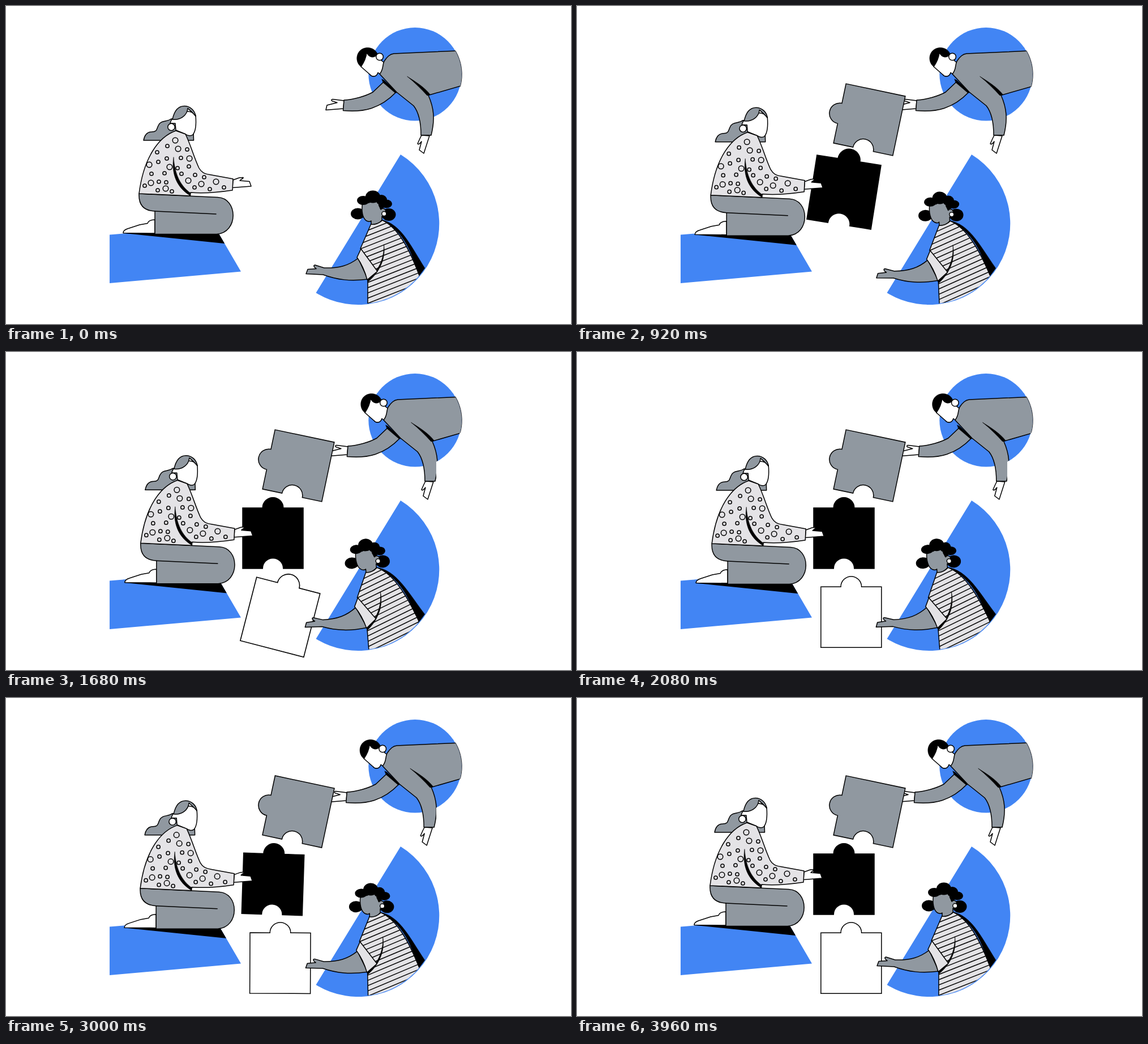
Recreate the animation shown at these times as an HTML page. Size 998x561 px, loop 4000 ms.

```html
<!DOCTYPE html>
<html lang="en">
<head>
<meta charset="utf-8">
<title>Teamwork puzzle</title>
<style>
  html, body { margin: 0; width: 100%; height: 100%; overflow: hidden; background: #fff; }
  svg { display: block; width: 100%; height: 100%; }
  .gray, .light, .white, .line, .ink { stroke: #000; stroke-width: 1.5; stroke-linejoin: round; stroke-linecap: round; }
  .gray { fill: #9098a0; }
  .light { fill: #e4e3e6; }
  .white { fill: #fff; }
  .line { fill: none; }
  .ink { fill: #000; stroke-width: .6; }
  .blue { fill: #4285f4; }
</style>
</head>
<body>
<svg viewBox="0 0 998 561">
  <defs>
    <clipPath id="diskClip"><rect width="760" height="561"/><circle cx="722.5" cy="120.3" r="82.2"/></clipPath>
    <clipPath id="fanClip"><circle cx="621.5" cy="383.7" r="142.3"/></clipPath>
    <clipPath id="matClip"><path d="M183 403.5L368 388L415 468.5L183 489Z"/></clipPath>
    <clipPath id="shirtClip"><path id="shirtShape" d="M645 384C652 386 659 383 665 378C694 392 714 432 731 478L722 530H639V482L655 468L626 428Z"/></clipPath>
  </defs>

  <path class="blue" d="M183 403.5L368 388L415 468.5L183 489Z"/>
  <circle class="blue" cx="722.5" cy="120.3" r="82.2"/>
  <path class="blue" d="M697 262A142.5 142.5 0 0 1 547.5 506Z"/>

  <!-- leaning man -->
  <g clip-path="url(#diskClip)"><g id="leaner">
    <path class="white" d="M597 167L577 164.500C573 165.500 575 168 579 168.500L585 170.500L567 175L565 183.500L596 181Z"/>
    <path class="gray" d="M667 134L648 152C635 159 615 165 597 166L595.500 184.500C632 188 661 181 689 152Z"/>
    <path class="ink" d="M664 129L668 131L692 153L687 153L666 135Z"/>
    <path class="white" d="M734 228L731 234L727 243C728 245 731 243 734 239L730 254L738 260L748 229Z"/>
    <path class="white" d="M637 82C641 90 649 93 656 85C664 80 669 91 663 96L668 100C667 110 665 115 662 121L657 117.500C655 125 647 126 643 121L627 107C632 100 636 92 637 82Z"/>
    <path class="gray" d="M685 84L830 77.600V133.400L746 157.500C756 180 758 200 751 228L733 228C733 210 731 190 720 176L690 152L660 120C668 111 664 102 669 96C674 89 678 85 685 84Z"/>
    <path class="ink" d="M709 124.500C724 134 739 143 749.500 156.500L744 158C734 147 722 135 709 124.500Z"/>
    <circle class="white" cx="660" cy="89.500" r="6.300"/>
    <path class="ink" d="M627 107C617 100 617 82 630 75.500C642 70 654 77 656 85C649 93 641 90 637 82C636 92 630 101 627 107Z"/>
  </g></g>
  <path class="line" style="stroke-width:.8" d="M794 79A82.200 82.200 0 0 1 802.500 142"/>

  <g id="pieces"></g>

  <!-- kneeling woman -->
  <g clip-path="url(#matClip)"><path id="shade" d="M205 400.500L400 396V420.500Z"/></g>
  <g id="kneeler">
    <path class="gray" d="M243 237C245 226 250 222 258 222C267 222 266 217 269 211C273 201 284 205 292 199L331 222L331.500 237Z"/>
    <path class="white" d="M297 196C308 188 325 180 335 193C336 205 336 220 330 227C327 230 321 229 317 226L300 219L299 207L290 207C291 202 293 199 297 196Z"/>
    <path class="gray" d="M294 200C297 186 304 176.500 315 176.500C326 176.500 334 185 335 194.500C330 188 325 184 321 180.500C320 193 308 202 294 200Z"/>
    <circle class="white" cx="292" cy="213.500" r="6.200"/>
    <path class="white" d="M207 400.500C207 396 211 394 216 392.500L236 386L250 383.500C252 378 257 377 263 377V401Z"/>
    <path class="gray" d="M235 331L374 337.500C410 339 411 400 372 402.500H263V362C243 361 234 351 235 331Z"/>
    <path class="line" d="M263 362L371 367"/>
    <path class="white" d="M401 307L412 303L419 302.500C420 304 414 306 413 308L430 309.500L433 318L400 320.500Z"/>
    <path class="light" d="M300 220C269 231 243 268 235 331L325 335L326 329C350 331 380 328 400 325L401 305L360 297.500C350 296 345 293 341 286C332 267 327 247 317 226Z"/>
    <g id="dots"></g>
    <path class="ink" d="M296 267C292 296 301 320 326 335V330C309 318 298 298 296 267Z"/>
  </g>

  <!-- reaching man -->
  <g clip-path="url(#fanClip)"><g id="reacher">
    <path class="ink" d="M662 377C700 384 716 427 746 472L730 484C720 440 704 396 662 377Z"/>
    <use href="#shirtShape" class="light"/>
    <g id="stripes" clip-path="url(#shirtClip)"></g>
    <path class="ink" d="M667.500 421C671 446 660 470 639 487V482C657 468 668 448 667.500 421Z"/>
    <path class="gray" d="M622 445C605 458 588 463 562 462L546 457C542 457 544 461 548 463.500L533 464.500L530 472.500L560 474C585 483 608 486 639 482Z"/>
    <path class="light" d="M620 443.500L627 428.500L656 468L638 483C634 468 629 456 620 443.500Z"/>
    <ellipse cx="621.500" cy="366.500" rx="12.500" ry="10"/>
    <ellipse cx="676" cy="368" rx="12.500" ry="11"/>
    <path class="gray" d="M630 345C627 362 630 375 637 379C641 381 644 380 645 379V385C652 386 660 383 664 378V371C672 371 673 358 666 357C662 357 662 361 661 356L657 343Z"/>
    <ellipse cx="631" cy="343" rx="11" ry="8"/>
    <ellipse cx="648" cy="336.500" rx="13" ry="11"/>
    <ellipse cx="640" cy="343" rx="5" ry="5"/>
    <ellipse cx="663" cy="342" rx="10" ry="9"/>
    <ellipse cx="672" cy="349" rx="10" ry="7.500"/>
    <path d="M657 343H668V355L662 360L658 352Z"/>
    <circle class="white" cx="667.800" cy="366.500" r="4"/>
  </g></g>
</svg>

<script>
const LOOP = 4000;
const $ = id => document.getElementById(id);

function add(parent, tag, attrs) {
  const el = document.createElementNS("http://www.w3.org/2000/svg", tag);
  for (const k in attrs) el.setAttribute(k, attrs[k]);
  return parent.appendChild(el);
}

// Smooth curve through [time, value] pairs, flat at both ends.
function curve(keys, t) {
  const n = keys.length - 1;
  if (t <= keys[0][0]) return keys[0][1];
  if (t >= keys[n][0]) return keys[n][1];
  let i = 0;
  while (t >= keys[i + 1][0]) i++;
  const slope = j => j === 0 || j === n ? 0
    : (keys[j + 1][1] - keys[j - 1][1]) / (keys[j + 1][0] - keys[j - 1][0]);
  const [t0, a] = keys[i], [t1, b] = keys[i + 1];
  const d = t1 - t0, u = (t - t0) / d, v = 1 - u;
  return v * v * (1 + 2 * u) * a + u * u * (3 - 2 * u) * b
    + d * u * v * (v * slope(i) - u * slope(i + 1));
}

const ease = x => (1 - Math.cos(Math.PI * Math.min(1, Math.max(0, x)))) / 2;
const sway = (t, top, leave, end) => ease(t / top) - ease((t - leave) / (end - leave));

// Blouse dots
const big = [[299,237],[304,252],[253,280],[324,269],[289,284],[256,312],[282,322],[322,308],[345,314],[371,310]];
const small = [[285,247],[267,258],[320,253],[269,275],[284,269],[309,268],[257,296],[280,295],[303,286],
  [310,296],[323,283],[245,317],[268,325],[270,310],[293,327],[283,311],[334,298],[350,302],[333,320],[360,323],[385,320]];
const dot = r => ([cx, cy]) => add($("dots"), "circle", { cx, cy, r, class: "line" });
big.forEach(dot(4.8));
small.forEach(dot(3.1));

// Shirt stripes
for (let y = 398; y < 580; y += 9.2)
  add($("stripes"), "path", { d: `M610 ${y}L750 ${y - 55}`, class: "line" });

// Puzzle pieces: square of half size 53.5 with round tabs and notches
const arc = (sweep, x, y) => `A18.3 18.3 0 0 ${sweep} ${x} ${y}`;
const H = 53.5, R = 18.3;
const topTab = `L${-R} ${-H}${arc(1, R, -H)}`;
const notch = `L${R} ${H}${arc(0, -R, H)}`;
const leftTab = `L${-H} ${R}${arc(1, -H, -R)}`;
const outline = (top, bottom, left) =>
  `M${-H} ${-H}${top}L${H} ${-H}L${H} ${H}${bottom}L${-H} ${H}${left}Z`;

const pieces = [
  { x: 516.5, y: 200.5, turn: 11.9, start: 0, fill: "#9098a0", d: outline("", notch, leftTab),
    wobble: [[2080, 0], [2680, -.4], [3320, .7], [3960, 0]] },
  { x: 471.5, y: 328.5, turn: 0, start: 600, fill: "#000", d: outline(topTab, notch, ""),
    wobble: [[2080, 0], [2680, 1.3], [3320, 2], [3960, 0]] },
  { x: 484.3, y: 467.7, turn: 0, start: 1200, fill: "#fff", d: outline(topTab, "", ""),
    wobble: [[2080, 0], [2680, 1.2], [3320, -.8], [3960, 0]] }
];
for (const p of pieces)
  p.el = add($("pieces"), "path", { d: p.d, fill: p.fill, stroke: "#000", "stroke-width": 1.5 });

const popScale = [[0, 0], [160, .74], [320, 1.07], [440, 1.09], [760, 1]];
const popTurn = [[0, -25], [160, -8], [320, 9], [460, 15], [640, 4], [760, .8], [880, 0]];

function draw(t) {
  const a = sway(t, 2150, 2350, 4000);
  const b = sway(t, 1700, 1950, 3600);
  const drop = `translate(${3.2 * a} ${7 * a})`;
  $("leaner").setAttribute("transform", `translate(${7.8 * a} 0)`);
  $("kneeler").setAttribute("transform", drop);
  $("shade").setAttribute("transform", drop);
  $("reacher").setAttribute("transform", `rotate(${-4.6 * b} 690 500)`);
  for (const p of pieces) {
    const u = t - p.start;
    const turn = p.turn + curve(popTurn, u) + curve(p.wobble, t);
    p.el.setAttribute("visibility", u > 0 ? "visible" : "hidden");
    p.el.setAttribute("transform", `translate(${p.x} ${p.y}) rotate(${turn}) scale(${curve(popScale, u)})`);
  }
}

let begin;
function tick(now) {
  begin ??= now;
  draw((now - begin) % LOOP);
  requestAnimationFrame(tick);
}
draw(0);
requestAnimationFrame(tick);
</script>
</body>
</html>
```
